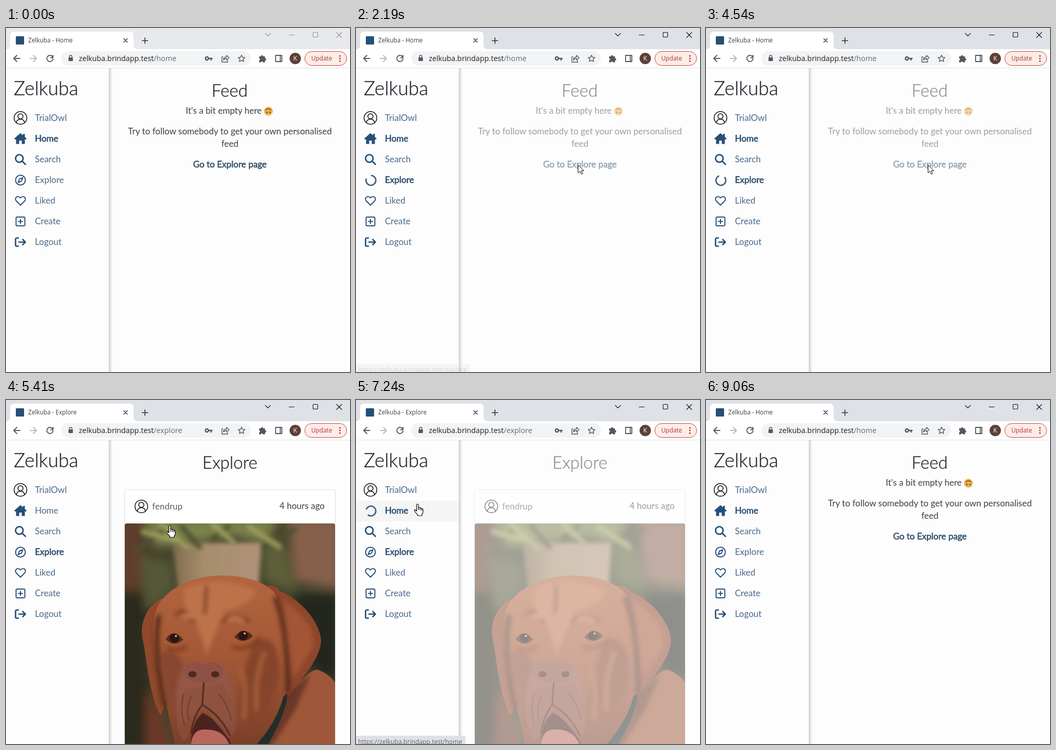
An HTML page that plays this animation: 666 px wide and 666 px high, repeating every 9390 ms.

```html
<!DOCTYPE html>
<html lang="en">
<head>
<meta charset="utf-8">
<title>Zelkuba</title>
<style>
html, body { margin: 0; width: 100%; height: 100%; overflow: hidden; background: #fdfdfd; }
svg { display: block; width: 100%; height: 100%; }
text { white-space: pre; }
.ui { font-family: "Open Sans", "Noto Sans", sans-serif; }
.body { font: 17px Lato, "Open Sans", sans-serif; fill: #3b3f45; }
.head { font: 300 33px Lato, "Open Sans", sans-serif; fill: #20242b; stroke: #20242b; stroke-width: .35; }
.nav { fill: #4a6a8b; }
.bold { fill: #2b4d70; stroke: #2b4d70; stroke-width: .6; }
.line { fill: none; stroke-linecap: round; stroke-linejoin: round; }
</style>
</head>
<body>
<svg viewBox="0 0 666 666">
  <defs>
    <g id="person" class="line" stroke="#0b0b0d" stroke-width="1.5">
      <circle r="12.3"/><circle cy="-3" r="5"/>
      <path d="M-8 9C-7 4.500-4 2.500 0 2.500S7 4.500 8 9"/>
    </g>
    <linearGradient id="shade">
      <stop stop-color="#000" stop-opacity=".19"/><stop offset="1" stop-color="#000" stop-opacity="0"/>
    </linearGradient>
    <linearGradient id="fur" x2="0" y2="1">
      <stop stop-color="#b2653f"/><stop offset=".5" stop-color="#a35735"/><stop offset="1" stop-color="#7a3f29"/>
    </linearGradient>
    <linearGradient id="pot">
      <stop stop-color="#7d6c4c"/><stop offset=".35" stop-color="#a68d6c"/><stop offset="1" stop-color="#b0927a"/>
    </linearGradient>
    <filter id="soft" x="-30%" y="-30%" width="160%" height="160%"><feGaussianBlur stdDeviation="9"/></filter>
    <filter id="smooth" x="-30%" y="-30%" width="160%" height="160%"><feGaussianBlur stdDeviation="4"/></filter>
    <clipPath id="frame"><path d="M230 666V243q0-4 4-4h399q4 0 4 4v423z"/></clipPath>
  </defs>

  <rect width="666" height="666" fill="#fdfdfd"/>

  <g id="feed">
    <text class="head" x="433" y="133" text-anchor="middle">Feed</text>
    <text class="body" x="348" y="166">It's a bit empty here</text>
    <g transform="translate(508 161)">
      <circle r="8.6" fill="#f2b04c"/>
      <path class="line" d="M-4.6-2.5Q0-7 4.6-2.5" stroke="#5b3c22" stroke-width="1.5"/>
      <ellipse cx="-3" cy="2.6" rx="1.2" ry="1.8" fill="#5b3c22"/>
      <ellipse cx="3" cy="2.6" rx="1.2" ry="1.8" fill="#5b3c22"/>
    </g>
    <text class="body" x="433.5" y="206" text-anchor="middle">Try to follow somebody to get your own personalised</text>
    <text class="body" x="433.5" y="230" text-anchor="middle">feed</text>
    <text id="link" class="body" x="433.5" y="270" text-anchor="middle" stroke-width=".6">Go to Explore page</text>
  </g>

  <g id="explore">
    <text class="head" x="433.5" y="133" text-anchor="middle">Explore</text>
    <path d="M229.500 666V177.500q0-4 4-4h400q4 0 4 4V666" fill="#fff" stroke="#dcdcde"/>
    <use href="#person" x="262" y="206"/>
    <text class="body" x="283" y="212" style="fill:#5e6065">fendrup</text>
    <text class="body" x="617" y="211" text-anchor="end">4 hours ago</text>
    <g clip-path="url(#frame)">
      <rect x="230" y="239" width="407" height="427" fill="#45432c"/>
      <g filter="url(#soft)">
        <rect x="215" y="230" width="50" height="150" fill="#5f3d2a"/>
        <path d="M215 370H300L270 450 290 680H215z" fill="#2b2a1d"/>
        <path d="M272 560L300 600 325 680H270z" fill="#6b3826"/>
        <path d="M265 230H530L500 280 440 262 370 275 290 285z" fill="#7c8149"/>
        <path d="M545 230H645V365L560 350z" fill="#86604c"/>
        <path d="M495 260L545 290 560 370 500 350z" fill="#5c5f37"/>
        <path d="M555 375H645V545L590 520z" fill="#23281d"/>
        <path d="M258 300L322 315 325 370 270 410z" fill="#555637"/>
      </g>
      <path d="M322 276H495L488 380H335z" fill="url(#pot)" filter="url(#smooth)"/>
      <g class="line" filter="url(#smooth)" stroke-width="9">
        <path d="M250 290L310 250M340 245L375 285M430 245L400 270M500 285L560 250" stroke="#4b5030"/>
        <path d="M265 255L330 272M300 240L350 285M400 240L440 275M470 245L530 285" stroke="#9da05f"/>
      </g>
      <path d="M500 600L540 570C570 545 590 522 603 522Q630 532 640 553V670H480z" fill="#9f5739"/>
      <path d="M515 590L548 560 590 530 560 600 515 670H480z" fill="#6a3826" filter="url(#smooth)"/>
      <path d="M302 384C270 400 258 435 265 465S276 570 299 610C310 600 312 540 310 480z" fill="#91492d"/>
      <path d="M500 361Q520 355 530 370C570 385 608 430 610 465 609 505 565 545 545 575 530 550 535 500 525 440z" fill="#8d462c"/>
      <path d="M425 340C370 338 318 360 296 395 280 425 283 465 291 500 299 550 312 590 327 666H487C515 640 540 600 544 550 549 495 541 410 519 372 497 350 462 341 425 340z" fill="url(#fur)"/>
      <g filter="url(#smooth)">
        <path class="line" d="M522 385Q546 440 546 565M296 420Q284 470 306 590" stroke="#5c2d1d" stroke-width="10"/>
        <path d="M345 365Q410 335 485 370 470 400 425 408 405 450 388 495 372 425 345 400z" fill="#bd724a"/>
        <path d="M480 470Q525 440 530 530 510 620 455 640 440 560 480 470z" fill="#854429"/>
        <path d="M300 490Q330 480 345 515L330 620Q310 570 300 490z" fill="#874730"/>
        <path d="M535 385Q600 430 595 475 575 515 555 535z" fill="#a35536"/>
        <path d="M350 505C325 540 325 600 340 630L383 590 430 635C450 625 445 550 420 510z" fill="#955745"/>
        <path class="line" d="M330 415Q348 398 364 430M417 430Q437 408 470 428M388 362L385 412M312 480Q330 490 348 478M440 478Q465 488 490 462" stroke="#78391f" stroke-width="6"/>
        <path class="line" d="M345 420Q352 412 360 420M432 425Q445 418 458 428" stroke="#c17a52" stroke-width="7"/>
        <path class="line" d="M500 490Q480 540 485 600M455 520Q468 560 460 615" stroke="#a9603e" stroke-width="7"/>
      </g>
      <path d="M345 530Q345 507 368 507 383 514 398 507 420 508 420 530 410 549 383 546 354 550 345 530z" fill="#8f5143"/>
      <ellipse cx="361" cy="531" rx="8" ry="6" fill="#4f2821"/>
      <ellipse cx="405" cy="531" rx="8" ry="6" fill="#4f2821"/>
      <path d="M358 666Q358 625 381 606 420 625 436 666z" fill="#4b231e"/>
      <path d="M358 666Q362 637 384 638 420 636 432 666z" fill="#b9665c"/>
      <path d="M345 560C326 595 326 640 344 660Q358 650 363 625L381 600Q400 615 430 655 452 645 446 600L420 550z" fill="#8c5040" opacity=".65"/>
      <path class="line" d="M383 548L380 590Q363 612 358 645M380 590Q415 610 434 650" stroke="#5a2e23" stroke-width="3.500"/>
      <path class="line" d="M344 570Q336 600 346 630M358 575Q348 600 354 620M412 570Q430 590 436 620" stroke="#69382b" stroke-width="2.500" opacity=".7"/>
      <path d="M309 463Q325 440 343 464 325 480 309 463zM442 459Q460 436 478 457 460 475 442 459z" fill="#552a1d"/>
      <circle cx="326" cy="461" r="9" fill="#2a1511"/><circle cx="459" cy="456" r="9" fill="#2a1511"/>
      <circle cx="329" cy="457" r="2" fill="#d9b9a5"/><circle cx="462" cy="452" r="2" fill="#d9b9a5"/>
      <path d="M545 568Q545 600 508 666H486Q526 620 537 574z" fill="#252d29"/>
    </g>
  </g>

  <rect y="78" width="199" height="588" fill="#fdfdfd"/>
  <rect x="199" y="78" width="7" height="588" fill="url(#shade)"/>
  <rect id="hover" width="199" height="40" fill="#f5f5f5"/>
  <text class="head" x="15" y="130" style="font-size:37px">Zelkuba</text>
  <use href="#person" x="28" y="174"/>
  <g id="nav"></g>
  <g id="spinner"><path class="line" d="M7.800-5.400A9.500 9.500 0 1 0 7.800 5.400" style="stroke-linecap:butt" stroke="#426080" stroke-width="2.700"/></g>

  <g class="ui">
    <rect id="titlebar" width="666" height="42"/>
    <path d="M0 41Q8 41 8 33V15Q8 7 16 7H239Q247 7 247 15V33Q247 41 255 41z" fill="#fff"/>
    <rect y="41" width="666" height="36" fill="#fff"/>
    <rect y="77" width="666" height="1" fill="#dfe1e4"/>
    <rect x="19" y="16" width="16" height="16" rx="1.500" fill="#264f78"/>
    <text id="title" x="43" y="28" font-size="11.700" fill="#3c4043"></text>
    <path class="line" d="M228 20.500l7 7m0-7l-7 7" stroke="#33384d" stroke-width="1.500"/>
    <path class="line" d="M269 19v11m-5.500-5.500h11" stroke="#303238" stroke-width="1.600"/>
    <g id="controls" class="line" stroke-width="1.100">
      <path d="M502 10.500l5 5 5-5M548 13.500h10M640 8.500l10 10m0-10l-10 10"/>
      <rect x="594.500" y="8.500" width="9" height="9" rx="1"/>
    </g>
    <g class="line" stroke="#55595e" stroke-width="1.900">
      <path d="M27 59H15m6-6l-6 6 6 6"/>
      <path d="M47 59h12m-6-6l6 6-6 6" stroke="#b7babd"/>
      <path d="M90 55.500A6 6 0 1 0 91 60M91 53v4.500h-4.500"/>
    </g>
    <rect x="107" y="45" width="367" height="28" rx="14" fill="#f1f3f4"/>
    <rect x="121" y="57" width="8.500" height="7" rx="1" fill="#53575b"/>
    <path class="line" d="M122.700 57v-1.500a2.500 2.500 0 0 1 5 0V57" stroke="#53575b" stroke-width="1.400"/>
    <text x="141" y="64" font-size="14.300" fill="#202124">zelkuba.brindapp.test<tspan id="path" fill="#676b70"></tspan></text>
    <g class="line" stroke="#53575b" stroke-width="1.400">
      <circle cx="389" cy="59" r="3" stroke-width="2.400"/><path d="M393 59h6m-2 0v3" stroke-width="2.400"/>
      <path d="M420 56h-2v10h11v-3M421 62q0-6 6-6v-3l5 4.500-5 4.500v-3q-4 0-6 3z"/>
      <path d="M456 52.500l1.900 4.300 4.700.5-3.500 3.100 1 4.600-4.100-2.400-4.100 2.400 1-4.600-3.500-3.100 4.700-.5z"/>
      <path d="M522 53h12v12h-12zM531 53v12h3V53z" stroke-width="1.800"/>
    </g>
    <path d="M490 55h3.500a2.300 2.300 0 0 1 4.600 0h3.400v3.500a2.300 2.300 0 0 1 0 4.600V66.500h-3.700a2.200 2.200 0 0 0-4.300 0H490v-3.700a2.200 2.200 0 0 0 0-4.300z" fill="#53575b"/>
    <circle cx="560" cy="59" r="11" fill="#5d4037"/>
    <text x="560" y="63.300" font-size="12" fill="#fff" text-anchor="middle">K</text>
    <rect x="578.500" y="45.500" width="81" height="27" rx="13.500" fill="#fcecea" stroke="#c4483b"/>
    <text x="591" y="63" font-size="11.800" fill="#b8362b">Update</text>
    <g fill="#b8362b"><circle cx="646.500" cy="54" r="1.600"/><circle cx="646.500" cy="59" r="1.600"/><circle cx="646.500" cy="64" r="1.600"/></g>

    <g id="status">
      <path id="bubble" fill="#dee1e6"/>
      <text id="address" x="4" y="666" font-size="12.100" fill="#5f6368"></text>
    </g>
  </g>

  <g id="cursor" stroke="#000" stroke-linejoin="round">
    <path id="arrow" d="M0 0V15.500L3.600 12.200 6.200 18 8.700 17 6.200 11.300H11z" fill="#fff"/>
    <path id="hand" d="M-1.700 1.500Q0-1 1.800 1.500V8L2.500 7.300Q4.500 6.500 5.200 8.300 7.500 7.500 8.200 9.400 10.500 9 10.700 11.500V16Q10.500 19 8.500 20.500V23H.2V21Q-3 18-5.800 13.500-6.300 11.200-4 11.500L-1.700 14zM1.800 8v4M5.200 9v3.500M8.200 10v3" fill="#fff" stroke-width="1.200"/>
  </g>
</svg>
<script>
const LOOP = 9390;
const CLICK_LINK = 1700, OPEN_EXPLORE = 4610, CLICK_HOME = 6900, OPEN_HOME = 7380;
const HOST = "https://zelkuba.brindapp.test";
const $ = id => document.getElementById(id);
const show = (id, on) => $(id).setAttribute("display", on ? "inline" : "none");
const ramp = (t, from, to) => Math.min(1, Math.max(0, (t - from) / (to - from)));
const setText = (id, text) => { if ($(id).textContent !== text) $(id).textContent = text; };

// Icons are centred on the origin.
const outline = (d, width = 2) =>
  `<path class="line" d="${d}" stroke="#264f78" stroke-width="${width}"/>`;
const solid = d => `<path d="${d}" fill="#264f78"/>`;
const items = [
  ["TrialOwl", ""],
  ["Home", solid("M0-11L12-.5 10.800 1.200H8.500V10H2.500V3.500H-2.500V10H-8.500V1.200H-10.800L-12-.5zM5-9.500H8.500V-2L5-5z")],
  ["Search", outline("M-9.500-2a7.300 7.300 0 1 0 14.600 0a7.300 7.300 0 1 0-14.600 0M3.500 3.500L9.500 9.500", 2.8)],
  ["Explore", outline("M-9.500 0a9.500 9.500 0 1 0 19 0a9.500 9.500 0 1 0-19 0M4.500-4.500L2 2-4.500 4.500-2-2z")],
  ["Liked", outline("M0 8.500L-8 .5C-13-5-5.500-12 0-5.500 5.500-12 13-5 8 .5z")],
  ["Create", outline("M-6.500-8.500h13q2 0 2 2v13q0 2-2 2h-13q-2 0-2-2v-13q0-2 2-2zM0-4V4M-4 0H4")],
  ["Logout", outline("M-4-8H-7Q-9.500-8-9.500-5.500V5.500Q-9.500 8-7 8H-4M-3 0H9M4.500-5L9.500 0 4.500 5", 2.7)]
];
$("nav").innerHTML = items.map(([name, icon], i) => {
  const y = 174 + i * 40 + (i ? .5 : 0);
  return `<g id="icon${i}" transform="translate(28 ${y})">${icon}</g>
    <text id="item${i}" class="body nav" x="56" y="${y + 5.5}">${name}</text>`;
}).join("");

// Time, x, y of the pointer tip.
const route = [
  [630, 649, 364], [760, 560, 318], [890, 470, 277], [1020, 430, 265],
  [4800, 430, 265], [5410, 318, 243], [5490, 265, 228], [5750, 149, 176], [5820, 140, 174],
  [6370, 140, 174], [6560, 119, 201], [8190, 119, 201],
  [8500, 265, 285], [8850, 556, 485], [8920, 592, 530], [8990, 637, 588]
];
function pointer(t) {
  const next = route.findIndex(point => point[0] > t);
  if (next < 0) return route[route.length - 1].slice(1);
  if (next === 0) return route[0].slice(1);
  const a = route[next - 1], b = route[next], k = ramp(t, a[0], b[0]);
  return [a[1] + (b[1] - a[1]) * k, a[2] + (b[2] - a[2]) * k];
}

// Path, fade-in start and end, fade-out start and end.
const hints = [
  ["/explore", 1190, 1310, 1900, 2300],
  ["/explore", 4600, 4610, 4870, 5300],
  ["/account", 5980, 6110, 6420, 6421],
  ["/home", 6419, 6420, 8330, 8750]
];

function updateStatus(t) {
  const hint = hints.find(h => t >= h[1] && t < h[4]);
  show("status", hint);
  if (!hint) return;
  const [path, inStart, inEnd, outStart, outEnd] = hint;
  setText("address", HOST + path);
  const right = $("address").getComputedTextLength() + 11;
  $("bubble").setAttribute("d", `M0 650H${right - 4}q4 0 4 4V666H0z`);
  $("status").setAttribute("opacity", ramp(t, inStart, inEnd) * (1 - ramp(t, outStart, outEnd)));
}

function update(t) {
  const exploring = t >= OPEN_EXPLORE && t < OPEN_HOME;
  const toExplore = t >= CLICK_LINK && t < OPEN_EXPLORE;
  const toHome = t >= CLICK_HOME && t < OPEN_HOME;
  const active = t >= CLICK_LINK;
  const [x, y] = pointer(t);
  const visible = t >= 630 && t < 9060;

  show("feed", !exploring);
  show("explore", exploring);
  $("feed").setAttribute("opacity", toExplore ? 1 - .5 * ramp(t, CLICK_LINK, CLICK_LINK + 200) : 1);
  $("explore").setAttribute("opacity", 1 - .5 * ramp(t, CLICK_HOME, CLICK_HOME + 200));
  setText("title", "Zelkuba - " + (exploring ? "Explore" : "Home"));
  setText("path", exploring ? "/explore" : "/home");
  $("titlebar").setAttribute("fill", active ? "#dee1e6" : "#e7e9ec");
  $("controls").setAttribute("stroke", active ? "#111" : "#929498");

  $("item1").classList.toggle("bold", !exploring || toHome);
  $("item3").classList.toggle("bold", exploring || toExplore);
  show("icon1", !toHome);
  show("icon3", !toExplore);
  show("spinner", toHome || toExplore);
  const turn = (t - (toHome ? CLICK_HOME : CLICK_LINK)) / 750 * 360;
  $("spinner").setAttribute("transform", `translate(28.8 ${toHome ? 215 : 295}) rotate(${turn})`);

  const onNav = visible && x < 199 && y >= 155 && y < 435;
  const onLink = visible && !exploring && !toExplore && x > 362 && x < 505 && y > 256 && y < 276;
  const onPhoto = exploring && x > 230 && x < 638 && y > 239;
  show("hover", onNav);
  $("hover").setAttribute("y", 155 + Math.floor((y - 155) / 40) * 40);
  const linkColor = onLink ? "#1c3247" : "#2e4d68";
  $("link").style.fill = linkColor;
  $("link").setAttribute("stroke", linkColor);

  const hand = onNav || onLink || onPhoto;
  show("cursor", visible);
  show("hand", hand);
  show("arrow", !hand);
  $("cursor").setAttribute("transform", `translate(${Math.round(x)} ${Math.round(y)})`);
  updateStatus(t);
}

const start = performance.now();
function tick() {
  update((performance.now() - start) % LOOP);
  requestAnimationFrame(tick);
}
tick();
</script>
</body>
</html>
```
